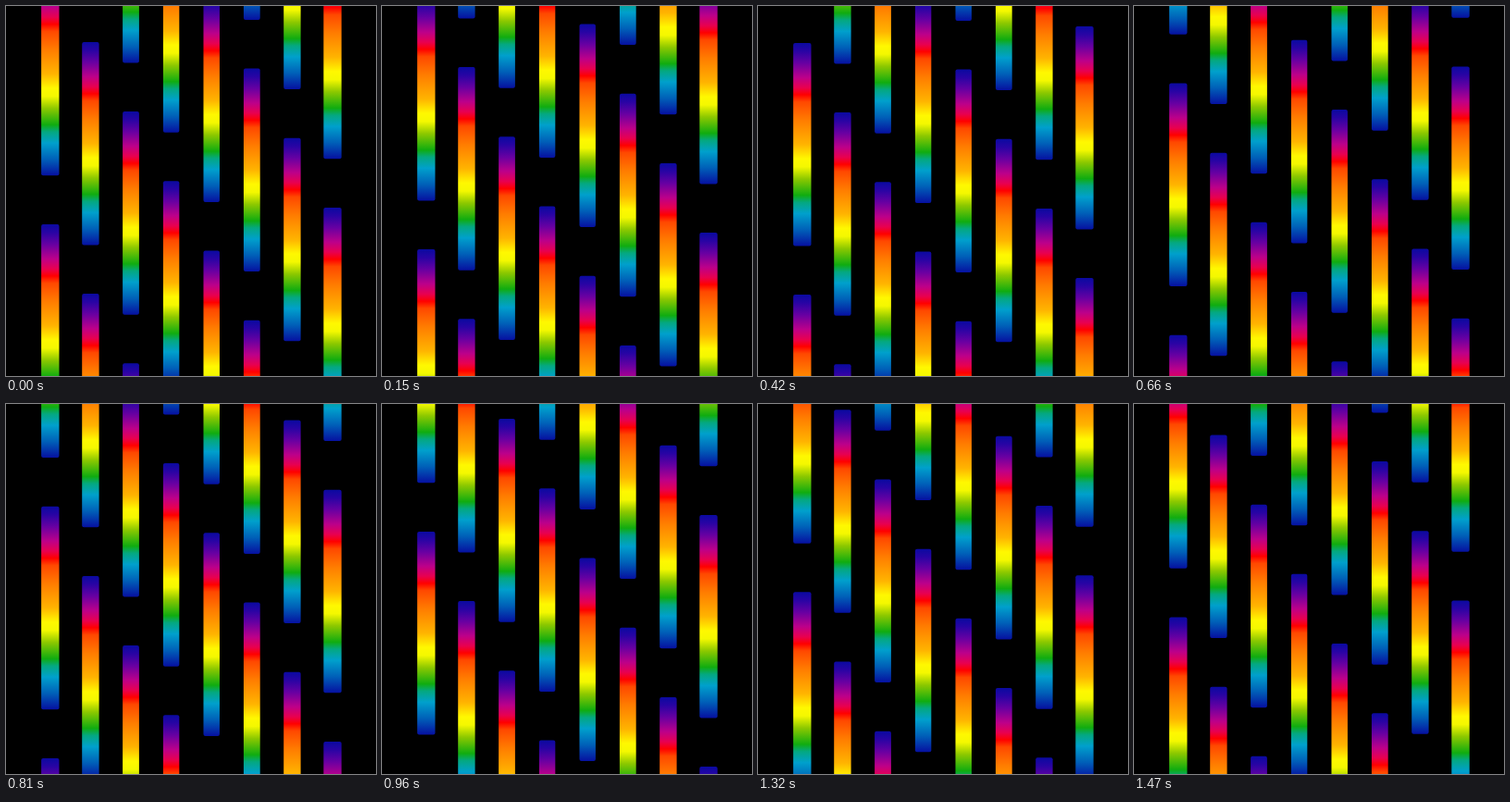
Animation of 400x400 px, one loop 1500 ms. Source, as an HTML page with a canvas:

```html
<!DOCTYPE html>
<html>
<head>
<meta charset="utf-8">
<style>
html, body { margin: 0; height: 100%; overflow: hidden; background: #000; }
canvas { display: block; }
</style>
</head>
<body>
<canvas width="400" height="400"></canvas>
<script>
const ctx = document.querySelector('canvas').getContext('2d');
const LOOP = 1500, STEP = 30;
const PERIOD = 272.2, BAR_HEIGHT = 219.6;
const COLUMNS = 8, CENTER = 200.4, PITCH = 43.6, STAGGER = 75.2, START = -36.3;

const rainbow = ctx.createLinearGradient(0, 0, 0, BAR_HEIGHT);
[
  [0, '#0a0aa0'], [0.04, '#2804a4'], [0.1, '#6800a2'], [0.17, '#bc008a'],
  [0.22, '#e80050'], [0.255, '#ff0000'], [0.29, '#ff4800'], [0.38, '#ff7c00'],
  [0.5, '#ffb400'], [0.57, '#fff800'], [0.61, '#f4f800'], [0.67, '#8cc800'],
  [0.75, '#10ac10'], [0.785, '#04a880'], [0.84, '#00a0cc'], [0.92, '#0060b8'],
  [1, '#0610a0']
].forEach(([at, color]) => rainbow.addColorStop(at, color));
ctx.fillStyle = rainbow;

function drawBar(x, y, width) {
  ctx.setTransform(1, 0, 0, 1, x, y);
  ctx.beginPath();
  ctx.roundRect(0, 0, width, BAR_HEIGHT, 2);
  ctx.fill();
}

function draw(now) {
  const time = Math.floor((now % LOOP) / STEP) * STEP;
  ctx.setTransform(1, 0, 0, 1, 0, 0);
  ctx.clearRect(0, 0, 400, 400);
  for (let i = 0; i < COLUMNS; i++) {
    // Columns widen slightly away from the middle.
    const offset = i - (COLUMNS - 1) / 2;
    const width = 17.4 + 0.16 * offset ** 2;
    const x = CENTER + offset * PITCH - width / 2;
    const shift = START + i * STAGGER + PERIOD * time / LOOP;
    const first = (shift % PERIOD + PERIOD) % PERIOD - PERIOD;
    for (let y = first; y < 400; y += PERIOD) drawBar(x, y, width);
  }
}

const begin = performance.now();
function tick() {
  draw(performance.now() - begin);
  requestAnimationFrame(tick);
}
tick();
</script>
</body>
</html>
```
